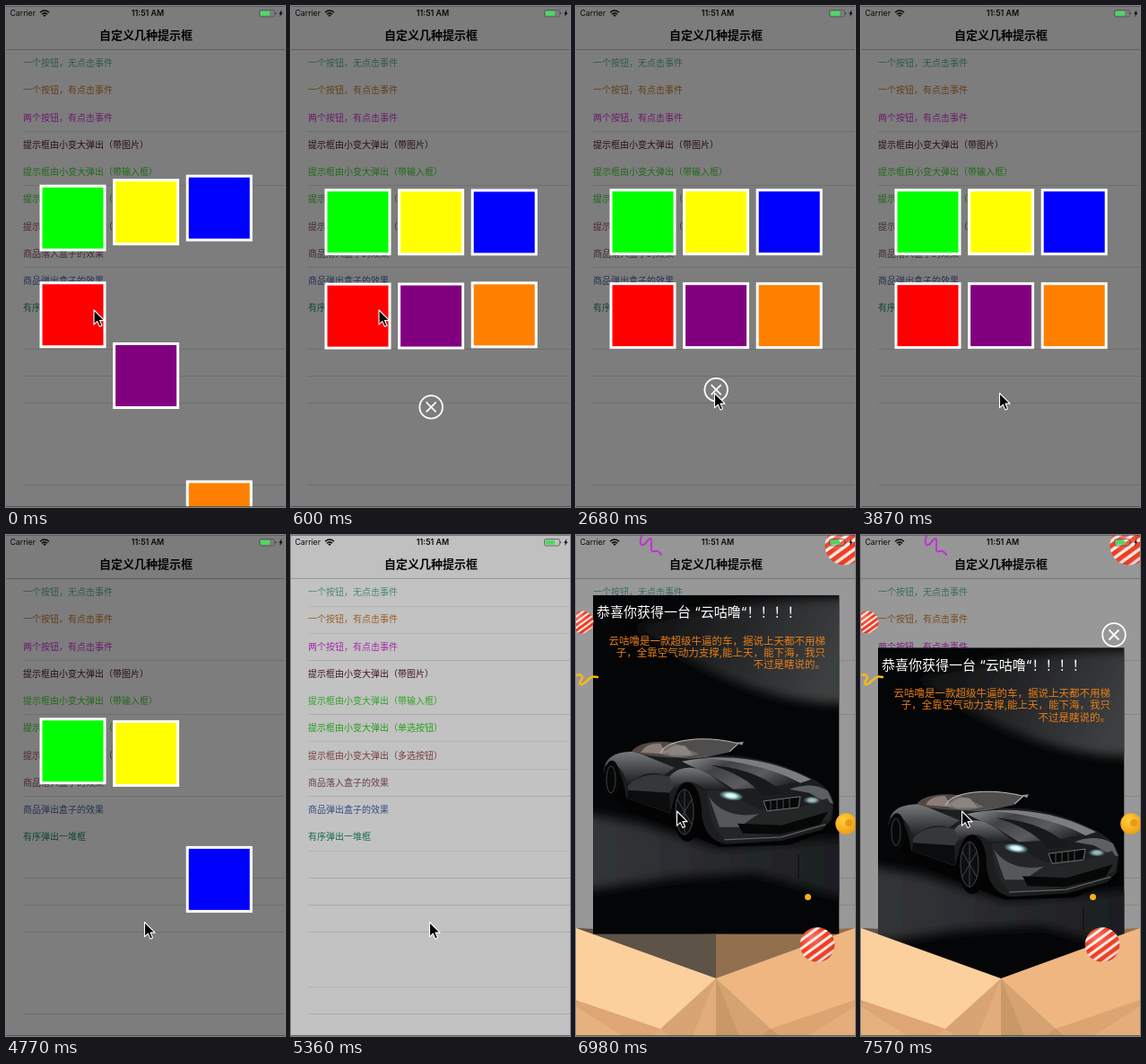
An HTML page that plays this animation: 311 px wide and 557 px high, repeating every 8 s.

```html
<!DOCTYPE html>
<html lang="zh">
<head>
<meta charset="utf-8">
<style>
html, body { margin: 0; width: 100%; height: 100%; overflow: hidden; background: #fcfcfc; }
svg { display: block; width: 100vw; height: 100vh; }
text { font-family: Inter, "Noto Sans CJK SC", "Noto Sans CJK", sans-serif; }
</style>
</head>
<body>
<svg id="stage" viewBox="0 0 311 557">
  <defs>
    <pattern id="stripes" width=".2" height=".2" viewBox="0 0 10 10" patternTransform="rotate(-36)">
      <rect width="10" height="10" fill="#fbeee8"/><rect width="10" height="6" fill="#f03a20"/>
    </pattern>
    <radialGradient id="shade" cx=".35" cy=".3" r=".75">
      <stop offset="0" stop-color="#fff" stop-opacity=".3"/>
      <stop offset=".55" stop-color="#fff" stop-opacity="0"/>
      <stop offset="1" stop-color="#700" stop-opacity=".2"/>
    </radialGradient>
    <radialGradient id="gold" cx=".4" cy=".35" r=".7">
      <stop offset="0" stop-color="#ffd23c"/><stop offset="1" stop-color="#f09a10"/>
    </radialGradient>
    <linearGradient id="haze" x1="0" y1="0" x2="1" y2=".25">
      <stop offset="0" stop-color="#0a0b0c"/><stop offset="1" stop-color="#3d3f41"/>
    </linearGradient>
    <linearGradient id="floor" x1="0" y1="0" x2="1" y2="0">
      <stop offset="0" stop-color="#34373a"/><stop offset="1" stop-color="#1b1d1f"/>
    </linearGradient>
    <linearGradient id="hood" x1="0" y1="0" x2="1" y2=".5">
      <stop offset="0" stop-color="#94969a"/><stop offset=".35" stop-color="#3f4143"/>
      <stop offset=".7" stop-color="#5a5c5f"/><stop offset="1" stop-color="#242628"/>
    </linearGradient>
    <linearGradient id="side" x1="0" y1="0" x2="0" y2="1">
      <stop offset="0" stop-color="#77797c"/><stop offset="1" stop-color="#16181a"/>
    </linearGradient>
    <radialGradient id="lamp">
      <stop offset="0" stop-color="#fff"/><stop offset=".4" stop-color="#c4eef0"/>
      <stop offset="1" stop-color="#7cc" stop-opacity="0"/>
    </radialGradient>
    <filter id="soft" x="-20%" y="-40%" width="140%" height="180%"><feGaussianBlur stdDeviation="6"/></filter>
    <clipPath id="cardEdge"><rect x="19" y="126" width="274.500" height="377"/></clipPath>
    <g id="close" fill="none" stroke="#fff" stroke-width="1.800">
      <circle r="12.800"/><path class="cross" d="M-5.500-5.500 5.500 5.500M5.500-5.500-5.500 5.500"/>
    </g>
  </defs>

  <rect width="311" height="557" fill="#fcfcfc"/>
  <rect width="311" height="48" fill="#f9f9f9"/>
  <path d="M0 48.500H311" stroke="#c4c4c4"/>
  <text x="156" y="37" font-size="13" font-weight="600" text-anchor="middle" fill="#080808">自定义几种提示框</text>
  <g id="list"></g>
  <rect id="dim" width="311" height="557"/>
  <g id="tiles"></g>
  <g id="tileClose"></g>

  <g id="gift">
    <path d="M0 437 156 444V493Z" fill="#5e5347"/>
    <path d="M311 437 156 444V493Z" fill="#93704d"/>
    <g id="card" >
      <g clip-path="url(#cardEdge)">
        <rect x="19" y="126" width="274.500" height="377" fill="#040506"/>
        <path d="M60 160C110 148 190 126 310 130V246C230 250 150 218 60 160Z" fill="url(#haze)" filter="url(#soft)"/>
        <path d="M5 368 70 380 160 408 305 395V465L200 435 110 440 5 455Z" fill="url(#floor)" filter="url(#soft)"/>
        <path d="M248 414V441" stroke="#0b0b0c"/>
      </g>
      <path d="M34 344 62 366 110 386 160 406 238 404 289 384 284 370 60 340Z" fill="#030304"/>
      <path d="M30 325C31 311 38 302 52 301L66 299C98 307 120 309 142 305C186 301 226 311 261 329C280 338 288 350 287 362L285 376 274 387 230 399 168 403C148 400 142 385 139 366C136 342 118 332 110 350L105 369 56 352C53 326 44 310 35 316Z" fill="#1b1d1f"/>
      <path d="M32 316C36 304 48 300 66 300L88 309 110 318 98 326C80 320 66 328 58 338C53 318 43 309 32 316Z" fill="url(#side)"/>
      <path d="M58 338C66 328 84 322 104 328L110 338 104 346 58 343Z" fill="#35383a"/>
      <path d="M58 343 104 346 105 368 57 352Z" fill="#0b0c0d"/>
      <path d="M104 328C114 316 132 314 150 326L172 343 146 344C136 334 120 328 110 342Z" fill="url(#side)"/>
      <path d="M118 311C162 301 222 310 262 331L214 340 176 342 150 326 126 315Z" fill="url(#hood)"/>
      <path d="M150 315C184 318 212 327 232 347L208 349C196 333 174 322 150 315Z" fill="#17191b"/>
      <path d="M142 307C188 304 228 313 262 331L250 335C222 319 184 311 142 307Z" fill="#7b7d80"/>
      <path d="M238 342C252 336 270 336 281 344L287 358 278 356 260 346Z" fill="#5d5f62"/>
      <path d="M146 344C160 341 176 345 190 357L206 365 250 362 280 352 286 362 282 375 232 392 168 398C152 388 146 365 146 344Z" fill="#232527"/>
      <path d="M148 350C160 368 182 374 204 369L182 384 160 384Z" fill="#55585b"/>
      <path d="M180 380 229 382 281 367 272 381 228 392 186 391Z" fill="#060707"/>
      <path d="M165 398 229 395 278 381" fill="none" stroke="#606366" stroke-width="1.200"/>
      <ellipse cx="40" cy="331" rx="9" ry="21" fill="#060707"/>
      <ellipse cx="39" cy="331" rx="5" ry="15" fill="none" stroke="#3c3f42"/>
      <path d="M62 300C68 291 87 287 109 290L137 303C115 309 84 307 62 300Z" fill="#514844"/>
      <path d="M72 301Q78 290 94 291L101 303ZM99 300Q110 290 122 294L130 304 105 304Z" fill="#8b7d76"/>
      <path d="M94 302C99 287 140 281 181 291L170 301 145 306C127 309 109 308 94 302Z" fill="#8f8b88" opacity=".55"/>
      <path d="M94 302C99 287 140 281 181 291L171 300" fill="none" stroke="#b8b7b5" stroke-width="1.100"/>
      <path d="M178 290 187 289 185 293Z" fill="#8d8f91"/>
      <ellipse cx="124" cy="367" rx="16" ry="33" fill="#040405"/>
      <ellipse cx="121" cy="367" rx="10" ry="25" fill="#0d0e0f" stroke="#414447"/>
      <path d="M121 343V391M113 353 129 381M129 353 113 381" stroke="#404346"/>
      <path d="M209 355 250 350 248 362 213 366Z" fill="#070808" stroke="#707376"/>
      <path d="M217 354V365M224 353V364M231 352V364M238 352V363" stroke="#4c4f51"/>
      <ellipse cx="173" cy="349" rx="14" ry="5.500" fill="url(#lamp)" transform="rotate(8 173 349)"/>
      <ellipse cx="263" cy="354" rx="10" ry="4.500" fill="url(#lamp)" opacity=".7"/>
      <text x="23" y="150.500" font-size="15" fill="#fff">恭喜你获得一台 “云咕噜“！！！！</text>
      <g font-size="11.500" fill="#e67d18" text-anchor="end">
        <text x="278" y="181">云咕噜是一款超级牛逼的车，据说上天都不用梯</text>
        <text x="278" y="194.300">子，全靠空气动力支撑,能上天，能下海，我只</text>
        <text x="278" y="207.600">不过是瞎说的。</text>
      </g>
    </g>
    <path d="M0 480 156 493V557H0Z" fill="#e2ad7b"/>
    <path d="M311 480 156 493V557H311Z" fill="#c99867"/>
    <path d="M156 493 94 549 105 557H130Z" fill="#d9a473"/>
    <path d="M156 493 217 549 206 557H182Z" fill="#d5a271"/>
    <path d="M0 517 94 549 84 557H0Z" fill="#dda674"/>
    <path d="M0 524 52 557H0Z" fill="#e5b17f"/>
    <path d="M311 517 217 549 227 557H311Z" fill="#dca471"/>
    <path d="M311 524 259 557H311Z" fill="#e4ad79"/>
    <path d="M0 437 156 493 94 549 0 517Z" fill="#fcd09d"/>
    <path d="M311 437 156 493 217 549 311 517Z" fill="#f0b681"/>
    <g id="balls"></g>
    <circle cx="301" cy="321" r="11.800" fill="url(#gold)"/>
    <circle cx="304" cy="320" r="4" fill="#d98009" opacity=".55"/>
    <circle cx="258.500" cy="402.500" r="3.500" fill="#f8b01a"/>
    <g fill="none" stroke-linecap="round" stroke-linejoin="round">
      <path d="M73 1C71 7 71 12 75 11S80 3 83 4 82 17 85 18 91 15 95 22" stroke="#c42fd8" stroke-width="2"/>
      <path d="M0 156C5 154 9 157 6 161S4 169 10 164 17 156 24 158" stroke="#f5b81d" stroke-width="2.500"/>
    </g>
  </g>
  <use id="giftClose" href="#close" x="282" y="111"/>

  <g id="status" fill="#0a0a0a">
    <text x="4.500" y="11.300" font-size="8.700">Carrier</text>
    <path d="M38 7.200Q43 2.800 48 7.200M39.900 9.200Q43 6.500 46.100 9.200" fill="none" stroke="#0a0a0a" stroke-width="1.500"/>
    <path d="M41.300 10.300Q43 8.900 44.700 10.300L43 12Z"/>
    <text x="158" y="11.300" font-size="8.900" font-weight="600" text-anchor="middle">11:51 AM</text>
    <rect x="282.500" y="4.500" width="17" height="7.500" rx="1.800" fill="none" stroke="#555" stroke-width=".8"/>
    <rect x="283.700" y="5.700" width="10.300" height="5.100" rx=".7" fill="#4cd964"/>
    <path d="M300.300 7V9.600Q302 8.300 300.300 7M307.500 4 304.200 8.700H306L305 12.300 308.600 7.400H306.700Z"/>
  </g>
  <path d="M0 .2H311M0 556.600H311" stroke="#444" stroke-width=".8"/>
  <path id="cursor" d="M0 0V16.200L3.800 12.600 6.400 18.400 9 17.200 6.500 11.600H11.600Z" fill="#000" stroke="#fff" stroke-width="1.100" stroke-linejoin="round"/>
</svg>
<script>
const LOOP = 8000;
const $ = id => document.getElementById(id);
const clamp = v => Math.min(1, Math.max(0, v));
const ramp = (t, from, to) => clamp((t - from) / (to - from));
const smooth = p => p * p * (3 - 2 * p);
const moveTo = (el, x, y) => el.setAttribute('transform', `translate(${x.toFixed(2)} ${y.toFixed(2)})`);

// Remaining distance of a damped spring, from 1 at the start towards 0.
function spring(t, start, rate, damping) {
  if (t <= start) return 1;
  const a = (t - start) / 1000 * rate;
  return Math.exp(-damping * a) * (Math.cos(a) + damping * Math.sin(a));
}
const DROP = 450;
const rise = (t, start) => DROP * spring(t, start, 7, 1.07);
const fall = (t, start) => DROP - rise(t, start);

const rows = [
  ['一个按钮，无点击事件', '#5fae9e'],
  ['一个按钮，有点击事件', '#c87a30'],
  ['两个按钮，有点击事件', '#d633d8'],
  ['提示框由小变大弹出（带图片）', '#4f1a2e'],
  ['提示框由小变大弹出（带输入框）', '#40d330'],
  ['提示框由小变大弹出（单选按钮）', '#30cd20'],
  ['提示框由小变大弹出（多选按钮）', '#984f55'],
  ['商品落入盒子的效果', '#875070'],
  ['商品弹出盒子的效果', '#4a60a8'],
  ['有序弹出一堆框', '#1c8862'],
];
const rules = ys => ys.map(y => `M19 ${y}.5H311`).join('');
$('list').innerHTML =
  `<path d="${rules([139, 199, 290, 381, 411, 441, 532])}" stroke="#dedede"/>` +
  `<path id="faint" d="${rules([79, 109, 229, 260, 351, 502])}" stroke="#e2e2e2"/>` +
  rows.map(([label, color], i) =>
    `<text x="19" y="${67.2 + 30.25 * i}" font-size="10" fill="${color}">${label}</text>`).join('');

$('tiles').innerHTML = ['#0f0', '#ff0', '#00f', '#f00', '#800080', '#ff8000'].map(color =>
  `<rect x="1.5" y="1.5" width="71" height="71" fill="${color}" stroke="#fff" stroke-width="3"/>`).join('');
const tiles = [...$('tiles').children];

$('tileClose').innerHTML = $('close').outerHTML.replace('id="close"', '');
const cross = $('tileClose').querySelector('.cross');

$('balls').innerHTML = [[299, 12, 21.5], [7, 97, 12.5], [269, 455.5, 19.3]].map(([x, y, r]) =>
  ['stripes', 'shade'].map(fill => `<circle cx="${x}" cy="${y}" r="${r}" fill="url(#${fill})"/>`).join('')).join('');

const cursorPath = [
  [0, 98, 338], [2010, 98, 338], [2370, 153, 438.5], [2560, 153, 438.5], [2670, 154.5, 430.5],
  [5560, 154.5, 430.5], [5980, 101.5, 312], [6220, 112.5, 307], [LOOP, 112.5, 307],
];
function cursorAt(t) {
  const i = cursorPath.findIndex(k => k[0] > t);
  const [t0, x0, y0] = cursorPath[i - 1], [t1, x1, y1] = cursorPath[i];
  const p = smooth(ramp(t, t0, t1));
  return [x0 + (x1 - x0) * p, y0 + (y1 - y0) * p];
}

function draw(t) {
  const tilesDim = 1 - ramp(t, 5200, 5500);
  const giftIn = ramp(t, 6580, 6780);
  $('dim').setAttribute('opacity', 0.5 * tilesDim + 0.4 * giftIn);
  $('faint').setAttribute('opacity', clamp(1 - tilesDim - giftIn));

  tiles.forEach((tile, i) => {
    const shift = t < 2500 ? rise(t, -643 + 100 * i) : fall(t, 4400 + 90 * (5 - i));
    moveTo(tile, 37.5 + 81.6 * (i % 3), (i < 3 ? 203.2 : 307.2) + shift);
  });
  $('tiles').style.display = t < 5500 ? '' : 'none';

  const closeShift = t < 2500 ? rise(t, 300) : fall(t, 3659);
  moveTo($('tileClose'), 156.2, 426.6 + closeShift);
  $('tileClose').style.display = t < 4300 ? '' : 'none';
  const turn = smooth(ramp(t, 1240, 1620)) + smooth(ramp(t, 3310, 3659));
  cross.setAttribute('transform', `rotate(${180 * turn})`);

  $('gift').style.display = giftIn ? '' : 'none';
  $('gift').setAttribute('opacity', giftIn);
  moveTo($('card'), 0, 431 * spring(t, 6640, 9.5, 0.63));
  $('giftClose').style.display = t >= 7500 ? '' : 'none';

  moveTo($('cursor'), ...cursorAt(t));
}

const begin = performance.now();
function tick() {
  draw((performance.now() - begin) % LOOP);
  requestAnimationFrame(tick);
}
draw(0);
requestAnimationFrame(tick);
</script>
</body>
</html>
```
